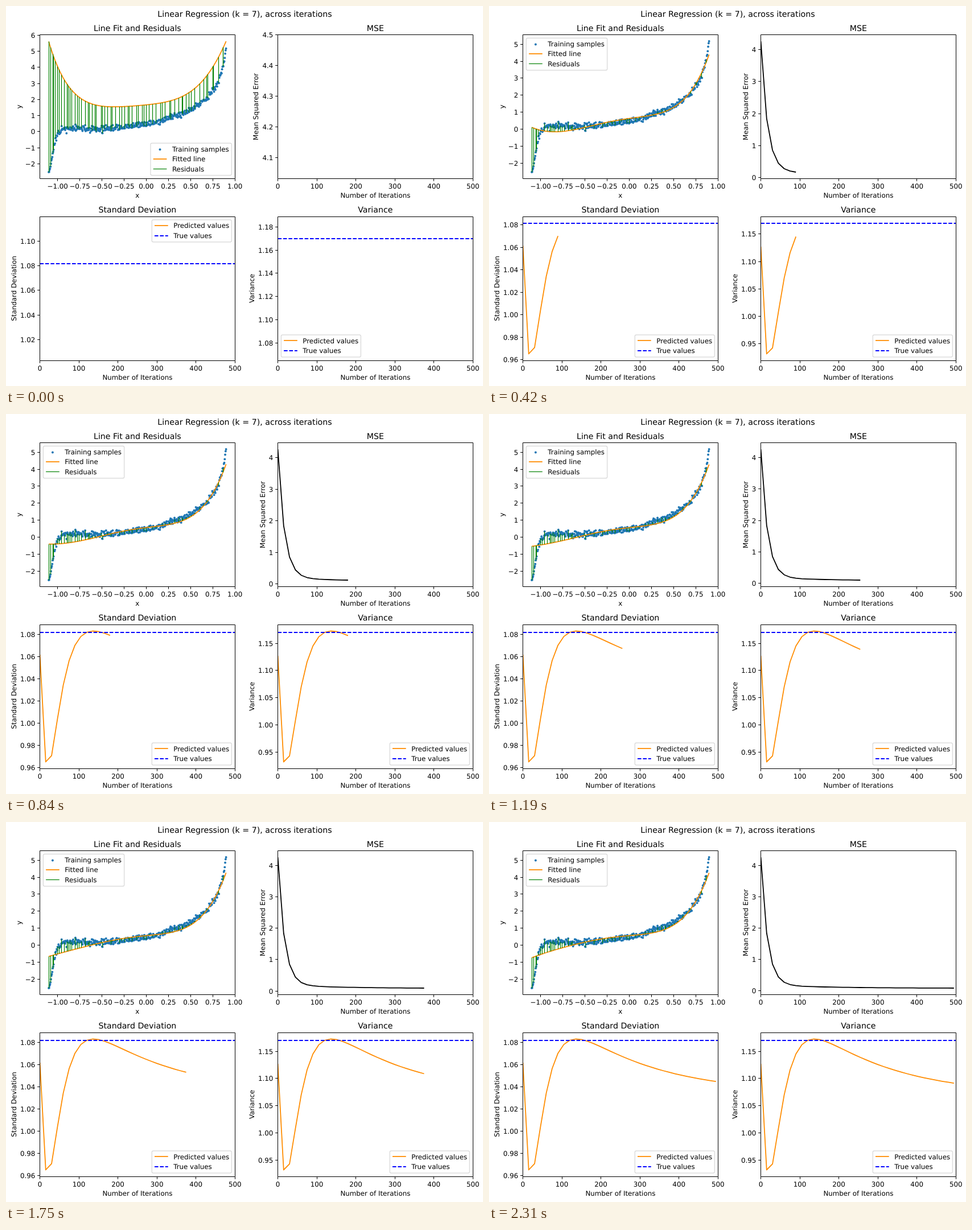
Recreate the animation shown at these times as an HTML page with a canvas. Size 838 by 668 pixels, loop 2.38 s.

```html
<!DOCTYPE html>
<html>
<head>
<meta charset="utf-8">
<style>
html, body { margin: 0; width: 100%; height: 100%; overflow: hidden; background: #fff; }
canvas { display: block; }
</style>
</head>
<body>
<canvas id="stage" width="838" height="668"></canvas>
<script>
const ctx = document.getElementById('stage').getContext('2d');
const { exp, floor, round, min, max } = Math;
const W = 342.7, H = 253, EM = 11.85, LINE = 1.78, THIN = 1.19;
const STEP_MS = 70, FRAMES = 34, ITERS = 15;
const ORANGE = '#ff8c00', GREEN = '#008000', BLUE = '#0000ff', DOT = '#1f77b4';
const DASH = [6.58, 2.84];
const TRUE_STD = 1.0817, TRUE_VAR = 1.17;
const N = 400, BARS = 66;

let seed = 11;
const rnd = () => (seed = seed * 16807 % 2147483647) / 2147483647;

// Gentle growth, a steep right end, a low shoulder and a sharp drop on the left
function trend(x) {
  const d = x + 1.1;
  return .48 * exp(2.15 * x) + 1.85 * exp(18.5 * (x - .9))
    + .14 * exp(-24 * d ** 4) - 2.7 * exp(-59 * d ** 1.5);
}

const samples = Array.from({ length: N }, (_, i) => {
  const x = -1.1 + 2 * i / (N - 1);
  const noise = (rnd() + rnd() + rnd() - 1.5) * .2;
  return [x, min(5.17, max(-2.51, trend(x) + noise))];
});
const residuals = Array.from({ length: BARS },
  (_, i) => samples[floor(N * ((i + rnd()) / BARS) ** 1.2)]);

// The fit settles as a fast and a slow decaying mode over its limit
const poly = (x, ...c) => c.reduceRight((sum, a) => sum * x + a, 0);
const fitAt = t => x =>
  poly(x, .57, .4, .05, 2, 2.02, .83)
  + poly(x, 0, .51, -.85, -.6, 1.15) * exp(-t / 250)
  + poly(x, 1.1, -.35, 1.5, 0, 0, -.8, 0, -.5) * exp(-t / 32.5);

const mse = t => .08 + .116 * exp(-t / 160) + 4.07 * exp(-t / 16.7);
const std = t => 1.0336 + .111 * exp(-t / 215)
  - exp(-t / 34.2) * (.515 - .432 * exp(-((t / 25.7) ** 1.1)));
const variance = t => std(t) ** 2;

function limits(vals) {
  let lo = min(...vals), hi = max(...vals);
  if (lo === hi) { lo *= .95; hi *= 1.05; }
  const pad = (hi - lo) * .05;
  return [lo - pad, hi + pad];
}

function ticks([lo, hi]) {
  const raw = (hi - lo) / 9, mag = 10 ** floor(Math.log10(raw));
  const step = mag * [1, 2, 2.5, 5, 10].find(s => s * mag >= raw);
  let digits = 0;
  while (Math.abs(step * 10 ** digits - round(step * 10 ** digits)) > 1e-6) digits++;
  const out = [];
  for (let k = Math.ceil(lo / step - 1e-6); k * step <= hi + 1e-6; k++)
    out.push([k * step, (k * step).toFixed(digits).replace('-', '\u2212')]);
  return out;
}

// Straight strokes sit on the pixel grid: thin ones on centres, thick ones on edges
const snap = (v, width = 1) => width > 1.5 ? round(v) : floor(v) + .5;

function text(s, x, y, align = 'center', size = EM) {
  ctx.font = size + 'px "DejaVu Sans", sans-serif';
  ctx.textAlign = align;
  ctx.fillStyle = '#000';
  ctx.fillText(s, x, round(y));
}

function line(pts, color, width = LINE, dash = []) {
  ctx.strokeStyle = color;
  ctx.lineWidth = width;
  ctx.setLineDash(dash);
  ctx.beginPath();
  pts.forEach(([x, y]) => ctx.lineTo(x, y));
  ctx.stroke();
  ctx.setLineDash([]);
}

function dot(x, y) {
  ctx.fillStyle = DOT;
  ctx.beginPath();
  ctx.arc(x, y, 1.95, 0, 7);
  ctx.fill();
}

function axes(left, top, title, xLabel, yLabel, xLim, yLim, plot) {
  const bottom = top + H;
  const px = x => left + (x - xLim[0]) / (xLim[1] - xLim[0]) * W;
  const py = y => bottom - (y - yLim[0]) / (yLim[1] - yLim[0]) * H;

  ctx.save();
  ctx.beginPath();
  ctx.rect(left, top, W, H);
  ctx.clip();
  plot(px, py);
  ctx.restore();

  const x0 = snap(left), x1 = snap(left + W), y0 = snap(top), y1 = snap(bottom);
  ctx.strokeStyle = '#000';
  ctx.lineWidth = 1;
  ctx.strokeRect(x0, y0, x1 - x0, y1 - y0);
  for (const [v, s] of ticks(xLim)) {
    const x = snap(px(v));
    line([[x, y1], [x, y1 + 4.3]], '#000', 1);
    text(s, px(v), bottom + 17.6);
  }
  let wide = 0;
  for (const [v, s] of ticks(yLim)) {
    const y = snap(py(v));
    line([[x0, y], [x0 - 4.3, y]], '#000', 1);
    text(s, left - 8.2, py(v) + 4.5, 'right');
    wide = max(wide, ctx.measureText(s).width);
  }
  text(title, left + W / 2, top - 6.9, 'center', 14.2);
  text(xLabel, left + W / 2, bottom + 33.8);
  ctx.save();
  ctx.translate(round(left - 15.2 - wide), top + H / 2);
  ctx.rotate(-Math.PI / 2);
  text(yLabel, 0, 0);
  ctx.restore();
}

function legend(left, top, atRight, atBottom, width, items) {
  const h = items.length * 17.6 + 3.7;
  const x = atRight ? left + W - 5.9 - width : left + 5.9;
  const y = atBottom ? top + H - 5.9 - h : top + 5.9;
  ctx.beginPath();
  ctx.roundRect(x, y, width, h, 2.4);
  ctx.fillStyle = 'rgba(255,255,255,.8)';
  ctx.fill();
  ctx.strokeStyle = 'rgba(204,204,204,.8)';
  ctx.lineWidth = THIN;
  ctx.stroke();
  items.forEach(([label, color, lw, dash], i) => {
    const cy = y + 10.2 + i * 17.6, ly = snap(cy, lw);
    if (lw) line([[x + 4.7, ly], [x + 28.4, ly]], color, lw, dash);
    else dot(x + 16.5, cy + .9);
    text(label, x + 37.9, cy + 4.3, 'left');
  });
}

const FIT_ITEMS = [['Training samples', DOT, 0], ['Fitted line', ORANGE, LINE], ['Residuals', GREEN, THIN]];
const VALUE_ITEMS = [['Predicted values', ORANGE, LINE], ['True values', BLUE, LINE, DASH]];

function series(left, top, title, yLabel, value, n, color, truth) {
  const seen = Array.from({ length: n + 1 }, (_, i) => value(i * ITERS));
  const yLim = limits(truth && n ? [...seen, truth] : seen);
  axes(left, top, title, 'Number of Iterations', yLabel, [0, 500], yLim, (px, py) => {
    if (n) line(seen.map((v, i) => [px(i * ITERS), py(v)]), color);
    if (truth) {
      const y = snap(py(truth), LINE);
      line([[px(0), y], [px(500), y]], BLUE, LINE, DASH);
    }
  });
}

function draw(n) {
  const L = 59.5, R = 477.5, T = 50.5, B = 370;
  ctx.fillStyle = '#fff';
  ctx.fillRect(0, 0, 838, 668);
  ctx.textRendering = 'geometricPrecision';
  ctx.lineJoin = 'round';
  text('Linear Regression (k = 7), across iterations', 419.5, 19, 'center', 14.2);

  const fit = fitAt(n * ITERS);
  const curve = samples.map(([x]) => [x, fit(x)]);
  const yLim = limits([...samples, ...curve].map(p => p[1]));
  axes(L, T, 'Line Fit and Residuals', 'x', 'y', [-1.2, 1], yLim, (px, py) => {
    samples.forEach(([x, y]) => dot(px(x), py(y)));
    line(curve.map(([x, y]) => [px(x), py(y)]), ORANGE);
    for (const [x, y] of residuals) {
      const bx = snap(px(x));
      line([[bx, py(y)], [bx, py(fit(x))]], GREEN, THIN);
    }
  });
  const low = n < 2;
  legend(L, T, low, low, 142.3, FIT_ITEMS);

  series(R, T, 'MSE', 'Mean Squared Error', mse, n, '#000');
  series(L, B, 'Standard Deviation', 'Standard Deviation', std, n, ORANGE, TRUE_STD);
  legend(L, B, true, n > 0, 140, VALUE_ITEMS);
  series(R, B, 'Variance', 'Variance', variance, n, ORANGE, TRUE_VAR);
  legend(R, B, n > 0, true, 140, VALUE_ITEMS);
}

let shown = -1;
function tick() {
  const n = floor(performance.now() / STEP_MS) % FRAMES;
  if (n !== shown) draw(shown = n);
  requestAnimationFrame(tick);
}
tick();
</script>
</body>
</html>
```
